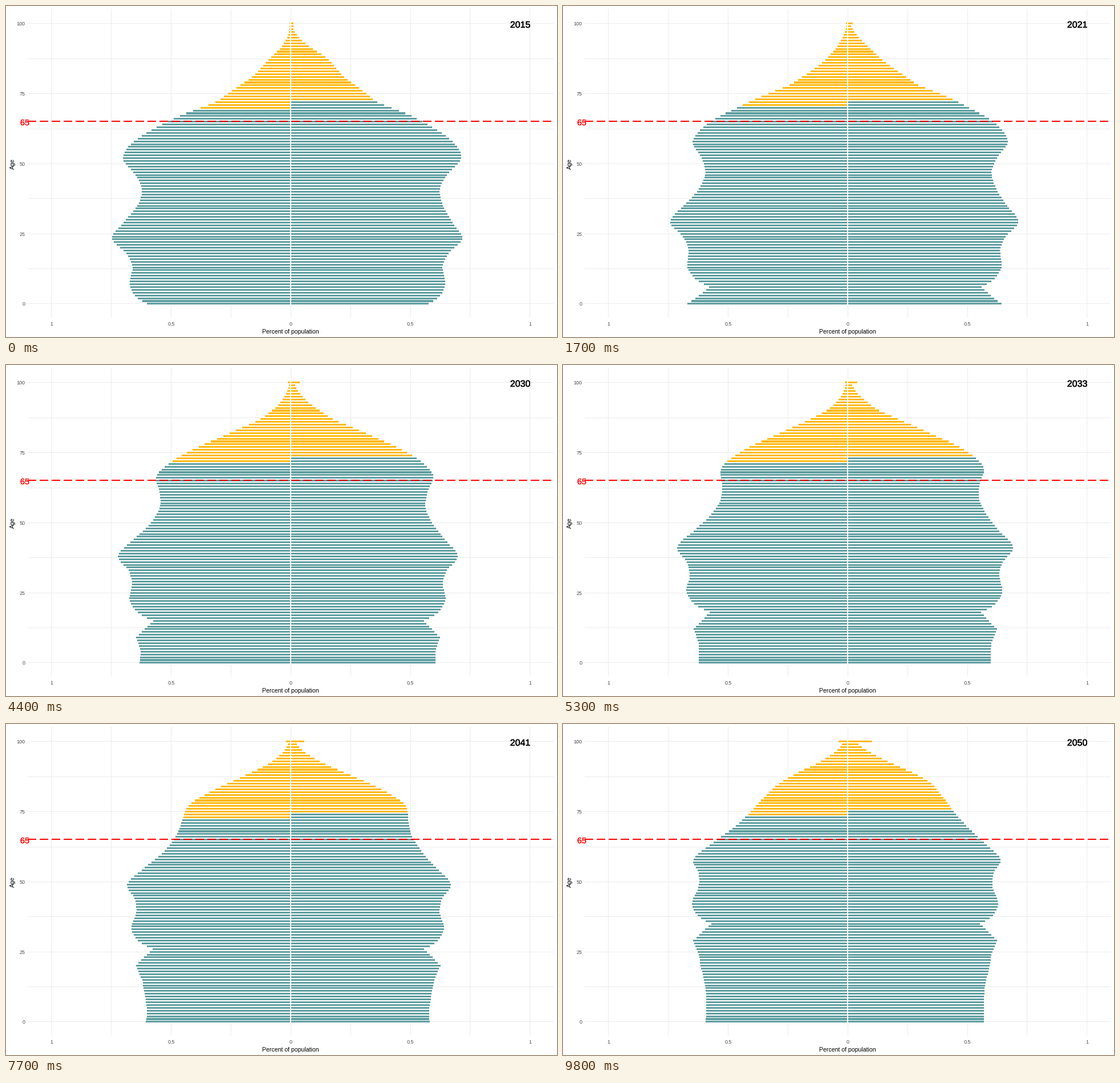
Recreate the animation shown at these times as a matplotlib script. Size 966x580 px, loop 10000 ms.

```python
import numpy as np
import matplotlib.pyplot as plt
from matplotlib.animation import FuncAnimation
from matplotlib.collections import PolyCollection
from matplotlib.patches import Rectangle
from matplotlib.patheffects import withStroke

W, H, DPI = 966, 580, 64
PT = 72 / DPI  # points per pixel
TEAL, GOLD, GRID, RED = "#5f9ea0", "#ffb90f", "#ebebeb", "#ff0000"
ZERO_X, ZERO_Y, STEP = 499, 521.9, 4.91
FIRST, LAST = 2015, 2050
AGES = np.arange(101)

# Bends of the first year's left side: (age, bar length in pixels)
BENDS = [(0, 251), (2, 267), (6, 280), (14, 277), (18, 287), (23, 312),
         (29, 292), (35, 268), (41, 260), (46, 271), (52, 293), (57, 279),
         (65, 214), (69, 170), (72, 131), (75, 109), (81, 67), (87, 38),
         (92, 14), (97, 2), (100, 1)]
BIRTHS = [(2015, 251), (2021, 280), (2026, 268), (2030, 264), (2037, 255),
          (2050, 248)]


def smooth(x, points):
    """Cubic curve through the points."""
    xs, vs = np.array(points, float).T
    slope = np.gradient(vs, xs)
    i = np.clip(np.searchsorted(xs, x, "right") - 1, 0, len(xs) - 2)
    h = xs[i + 1] - xs[i]
    t = (x - xs[i]) / h
    return ((1 + 2 * t) * (1 - t) ** 2 * vs[i]
            + t * (1 - t) ** 2 * h * slope[i]
            + t * t * (3 - 2 * t) * vs[i + 1]
            + t * t * (t - 1) * h * slope[i + 1])


def loss(year):
    """Yearly shrinkage of a cohort's share at each age."""
    child = 0.01 * np.exp(-AGES / 8)
    adult = 0.0003 * np.maximum(AGES - 24, -8)
    old = 0.043 * np.exp(0.12 * (AGES - 80))
    t = year - 2026
    return (child + adult) * np.exp(-0.025 * t) + old * np.exp(-0.01 * t)


def project(start, risk, birth_scale):
    """Age the population one year at a time; 100 collects everyone older."""
    states = [start]
    for year in range(FIRST + 1, LAST + 1):
        kept = states[-1] * np.exp(-risk * loss(year))
        grown = np.roll(kept, 1)
        grown[0] = birth_scale * np.interp(year, *zip(*BIRTHS))
        grown[100] = kept[99] + kept[100]
        states.append(grown)
    return np.rint(states)


men = np.maximum(smooth(AGES, BENDS), 0)
ratio = (0.96 + 0.037 / (1 + np.exp((32 - AGES) / 2))
         + 0.735 * np.exp(0.103 * (AGES - 87)))
LEFT = project(men, 1, 1)
RIGHT = project(men * ratio, 0.79, 0.96)


def year_at(ms):
    if ms < 200:
        return FIRST
    if ms < 8600:
        return 2016 + (ms - 200) // 300
    return 2044 + (ms - 8600) // 200


def box(x0, x1, y0, y1):
    return [(x0, y0), (x1, y0), (x1, y1), (x0, y1)]


fig = plt.figure(figsize=(W / DPI, H / DPI), dpi=DPI, facecolor="white")
ax = fig.add_axes([0, 0, 1, 1])
ax.set_xlim(0, W)
ax.set_ylim(H, 0)
ax.axis("off")


def block(x, y, w, h, color, z):
    ax.add_patch(Rectangle((x, y), w, h, fc=color, lw=0, aa=False, zorder=z))


def label(x, y, s, size, color="black", ha="center", bold=0, **kw):
    t = ax.text(x, y, s, fontsize=size * PT, color=color, ha=ha, zorder=6,
                family="Liberation Sans", **kw)
    if bold:
        t.set_path_effects([withStroke(linewidth=bold * PT, foreground=color)])
    return t


for i in range(9):
    gx = ZERO_X + 0.2 + (i - 4) * 104.9
    gy = ZERO_Y - i * 12.5 * STEP
    block(np.floor(gx), 5, 1, 541, GRID, 0)
    block(38, np.floor(gy), 922, 1, GRID, 0)
    if i % 2 == 0:
        label(gx, 560, f"{abs(i - 4) / 4:g}", 9, "#4d4d4d")
        label(33.5, gy + 3.5, f"{i * 12.5:g}", 9, "#4d4d4d", "right")

label(499, 573.5, "Percent of population", 10.5)
label(12, 276.5, "Age", 10.5, rotation=90, va="center")

for x in range(38, 960, 21):
    block(x, 201, min(15, 960 - x), 2, RED, 5)
label(33, 209, "65", 14.5, RED, bold=0.2)
year_text = label(901.5, 38, str(FIRST), 16, bold=0.5)

halo = PolyCollection([], facecolors="white", lw=0, antialiaseds=False, zorder=2)
bars = PolyCollection([], lw=0, antialiaseds=False, zorder=3)
ax.add_collection(halo, autolim=False)
ax.add_collection(bars, autolim=False)

mid = ZERO_Y - STEP * AGES
top, bottom = np.rint(mid - 1.52), np.rint(mid + 1.52)


def draw(i):
    year = int(year_at(i * 100))
    n = year - FIRST
    limits = round(70 + 0.125 * n), round(72.6 + 0.09 * n)
    inner = ZERO_X - 1, ZERO_X + 1
    shapes, colors, back = [], [], []
    for a, t, b, lw, rw in zip(AGES, top, bottom, LEFT[n], RIGHT[n]):
        x0, x1 = inner[0] - lw, inner[1] + rw
        back.append(box(x0 - 1, x1 + 1, t - 1, b + 1))
        shapes += [box(x0, inner[0], t, b), box(inner[1], x1, t, b)]
        colors += [GOLD if a >= limit else TEAL for limit in limits]
    halo.set_verts(back)
    bars.set_verts(shapes)
    bars.set_facecolor(colors)
    year_text.set_text(str(year))
    return halo, bars, year_text


anim = FuncAnimation(fig, draw, frames=100, interval=100, repeat=True,
                     repeat_delay=0, blit=False)
plt.show()
```
